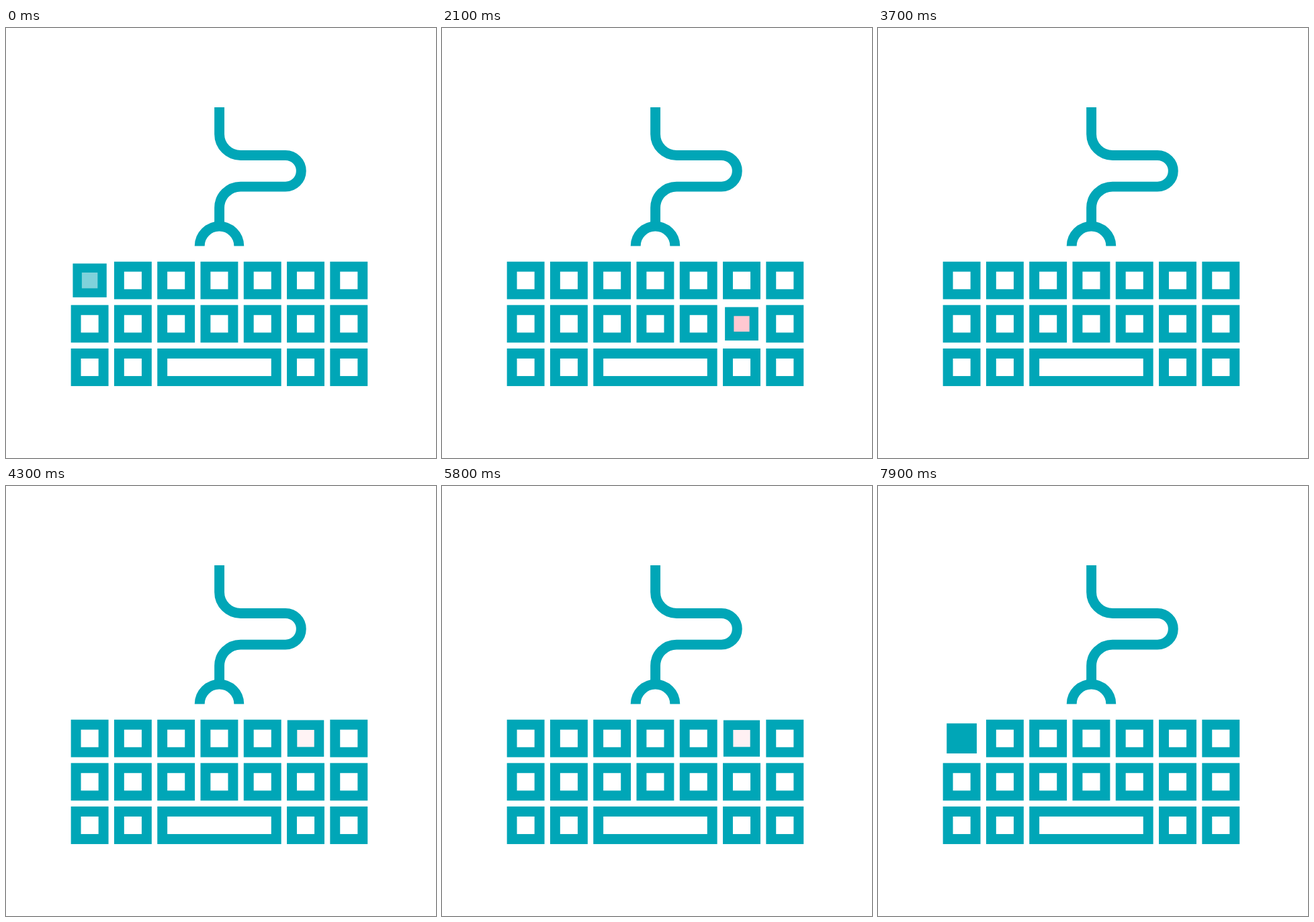
Write an HTML page without scripts that moves like this. It is 640 px wide and 640 px high and loops after 8000 ms.

```html
<!DOCTYPE html>
<html lang="en">
<head>
<meta charset="utf-8">
<title>Typing keyboard</title>
<style>
  @property --t { syntax: "<number>"; inherits: true; initial-value: 0; }
  @property --p { syntax: "<number>"; inherits: false; initial-value: 0; }

  html, body { margin: 0; width: 100%; height: 100%; overflow: hidden; background: #fff; }

  /* --t is a clock in ms that ticks ten times a second */
  svg {
    display: block; width: 100vw; height: 100vh;
    fill: none; stroke: #00a6b7; stroke-width: 14.9;
    animation: clock 8s steps(80) -10ms infinite;
  }
  @keyframes clock { from { --t: 0; } to { --t: 8000; } }

  /* --a to --d are the moments a key is fully down: 100 ms in, 200 ms out */
  rect {
    --a: -999; --b: -999; --c: -999; --d: -999;
    --p: max(0,
      min(1 + (var(--t) - var(--a)) / 100, 1 - (var(--t) - var(--a)) / 200),
      min(1 + (var(--t) - var(--b)) / 100, 1 - (var(--t) - var(--b)) / 200),
      min(1 + (var(--t) - var(--c)) / 100, 1 - (var(--t) - var(--c)) / 200),
      min(1 + (var(--t) - var(--d)) / 100, 1 - (var(--t) - var(--d)) / 200));
    x: -20.5px; y: -20.5px; width: 41px; height: 41px;
    fill: #ff9cac;
    fill-opacity: var(--p);
    transform: translateX(calc(var(--x) * 64.28px)) scale(calc(1 - .2 * var(--p)));
  }
  .left { fill: #00a6b7; }
  .space { x: -84.75px; width: 169.5px; }
</style>
</head>
<body>
<svg viewBox="0 0 640 640">
  <path d="M317.6 118V158A31.5 31.5 0 0 0 349.1 189.5H416A23.3 23.3 0 0 1 416 236.1H349.1A31.5 31.5 0 0 0 317.6 267.6V292"/>
  <path d="M288.2 324.4A29.3 29.3 0 0 1 346.8 324.4"/>

  <g transform="translate(124.6 375.7)">
    <rect class="left" style="--x:0; --a:-100; --b:1900; --c:5500; --d:7900"/>
    <rect class="left" style="--x:1; --a:3500; --b:6700"/>
    <rect class="left" style="--x:2; --a:700"/>
    <rect style="--x:3; --a:620"/>
    <rect style="--x:4"/>
    <rect style="--x:5; --a:4125; --b:5630; --c:7650"/>
    <rect style="--x:6; --a:1450; --b:2880; --c:6880"/>
  </g>
  <g transform="translate(124.6 440.3)">
    <rect class="left" style="--x:0; --a:3900; --b:5100; --c:7100"/>
    <rect class="left" style="--x:1; --a:300; --b:2300"/>
    <rect class="left" style="--x:2; --a:4700"/>
    <rect style="--x:3; --a:1030"/>
    <rect style="--x:4; --a:3850; --b:5980; --c:7150"/>
    <rect style="--x:5; --a:2010"/>
    <rect style="--x:6; --a:4550"/>
  </g>
  <g transform="translate(124.6 505)">
    <rect class="left" style="--x:0; --a:2700"/>
    <rect class="left" style="--x:1"/>
    <rect class="space" style="--x:3; --a:263; --b:2550; --c:3380; --d:5063"/>
    <rect style="--x:5"/>
    <rect style="--x:6"/>
  </g>
</svg>
</body>
</html>
```
